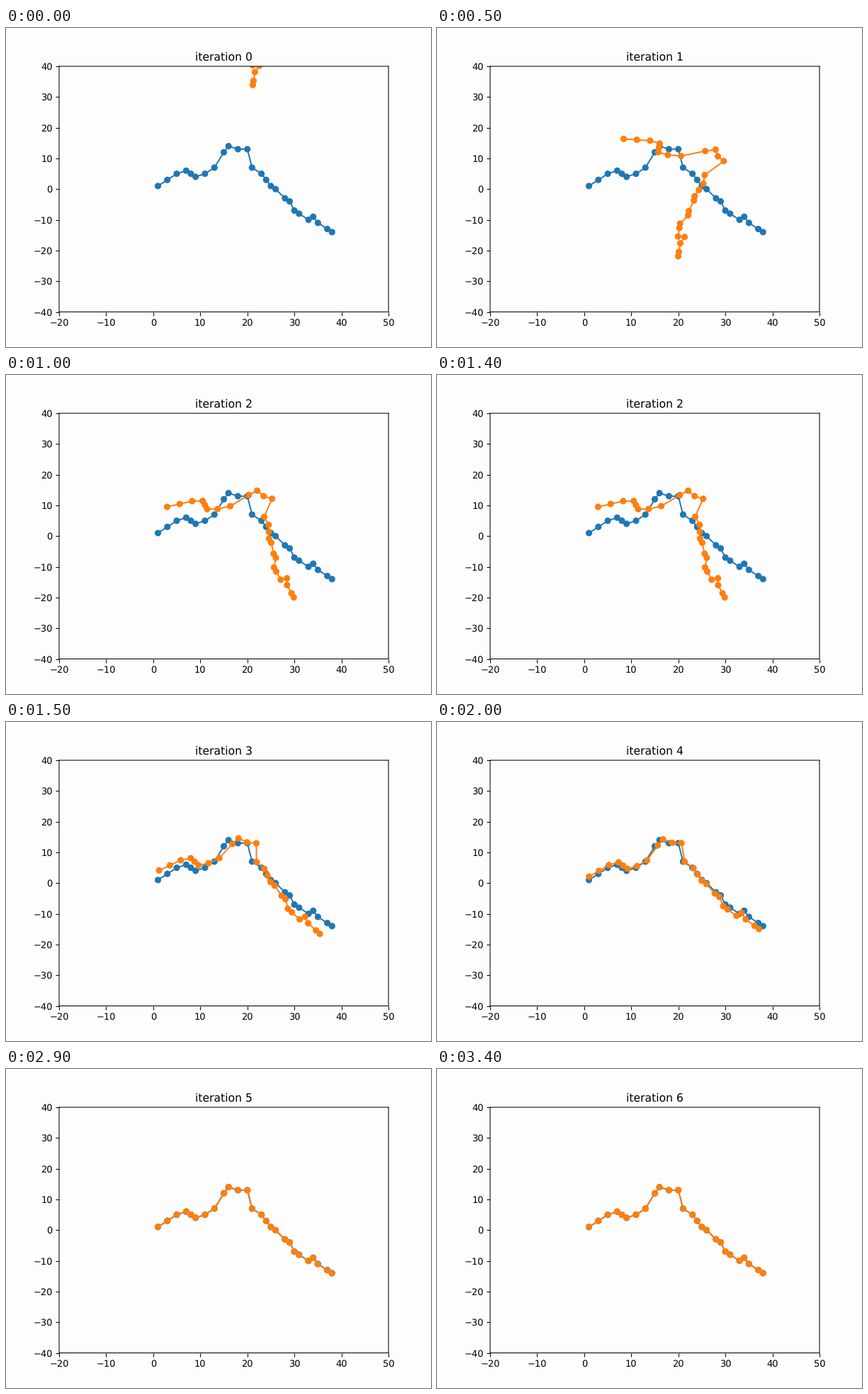
These frames come from a looping animation (600 px wide and 450 px high, 3.5 s). A matplotlib script:

```python
import numpy as np
import matplotlib.pyplot as plt
from matplotlib.animation import FuncAnimation

DPI = 93.75
PAPER = "#fdfdfd"
BLUE, ORANGE = "#1f77b4", "#ff7f0e"
STEPS = 7

plt.rcParams.update({
    "font.family": "DejaVu Sans",
    "text.hinting": "none",
    "path.snap": False,
})


def make_curve():
    """Points x + iy on whole numbers along a bent line, with some x left out."""
    gaps = (2, 4, 6, 10, 12, 14, 17, 19, 22, 27, 32, 36)
    bends = [(1, 1), (7, 6.4), (9, 3.8), (13, 6.8), (16, 13.9), (20, 12.6),
             (21, 7), (23, 4.6), (28, -3.4), (29, -4), (30, -7), (33, -10),
             (34, -9), (35, -11), (38, -14)]
    x = np.setdiff1d(np.arange(1, 39), gaps)
    return x + 1j * np.round(np.interp(x, *zip(*bends)))


def align(points, goal):
    """Turn centred points to best fit their nearest neighbours in goal."""
    nearest = goal[np.abs(points[:, None] - goal).argmin(axis=1)]
    turn = np.angle(np.sum(points.conj() * nearest))
    return points * np.exp(1j * turn)


def match_steps(curve):
    """The moving curve: far away, then centred, then turned step by step."""
    center = curve.mean()
    goal = curve - center
    points = goal * np.exp(-1j * np.radians(51.06))
    steps = [points + center + 1.2 + 55.75j]
    while len(steps) < STEPS:
        steps.append(points + center)
        points = align(points, goal)
    return steps


curve = make_curve()
steps = match_steps(curve)

fig, ax = plt.subplots(figsize=(600 / DPI, 450 / DPI), dpi=DPI, facecolor=PAPER)
ax.set_facecolor(PAPER)
ax.set(xlim=(-20, 50), ylim=(-40, 40))
title = ax.set_title("")


def draw_chain(points, color):
    line, = ax.plot(points.real, points.imag, color=color)
    # One colour per dot keeps the dots at sub-pixel positions.
    dots = ax.scatter(points.real, points.imag, s=36, linewidths=1,
                      color=[color] * len(points), zorder=2)
    return line, dots


draw_chain(curve, BLUE)
line, dots = draw_chain(steps[0], ORANGE)


def update(i):
    points = steps[i]
    line.set_data(points.real, points.imag)
    dots.set_offsets(np.column_stack([points.real, points.imag]))
    title.set_text(f"iteration {i}")
    return line, dots, title


anim = FuncAnimation(fig, update, frames=STEPS, interval=500,
                     repeat=True, repeat_delay=0, blit=False)
plt.show()
```
